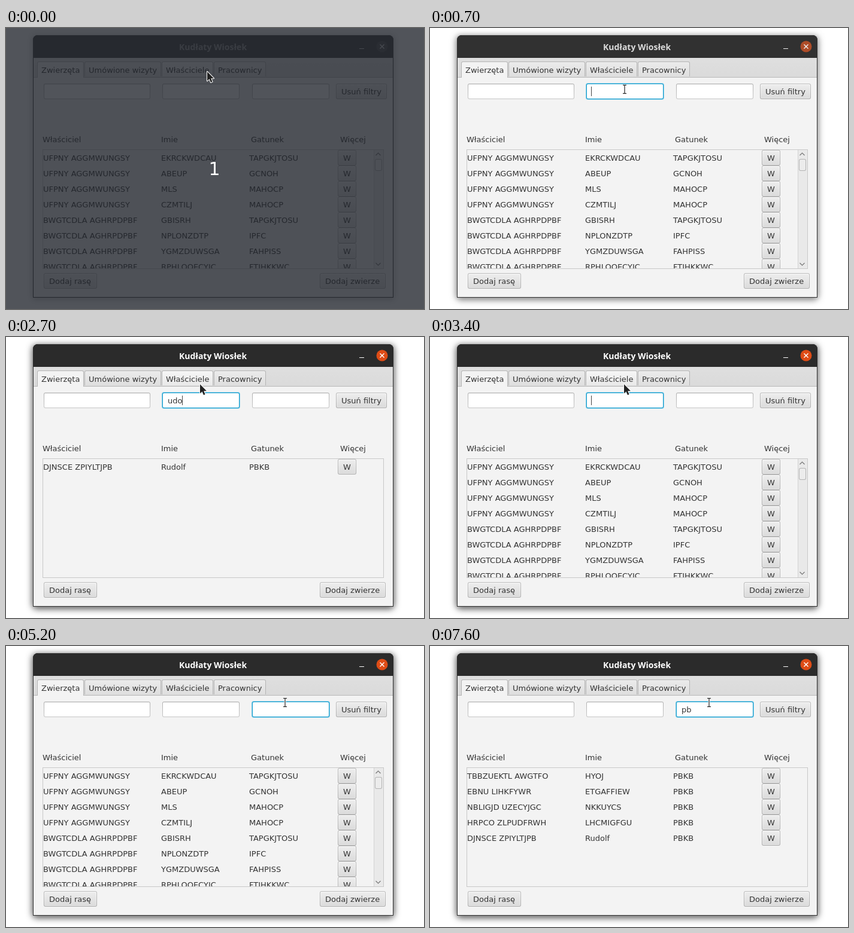
An HTML page with a canvas that plays this animation: 698x470 px, repeating every 8 s.

```html
<!DOCTYPE html>
<html lang="pl">
<head>
<meta charset="utf-8">
<title>Kudłaty Wiosłek</title>
<style>
html, body { margin: 0; width: 100%; height: 100%; overflow: hidden; background: #fff; }
canvas { display: block; }
</style>
</head>
<body>
<canvas id="stage" width="698" height="470"></canvas>
<script>
const ctx = document.getElementById("stage").getContext("2d");
const LOOP = 8000, STEP = 100;
const FONT = '13px "DejaVu Sans", sans-serif';

const TABS = [
  { x: 52, w: 78, label: "Zwierzęta" },
  { x: 131, w: 128, label: "Umówione wizyty" },
  { x: 260, w: 86, label: "Właściciele" },
  { x: 347, w: 87, label: "Pracownicy" }
];
const FIELDS = [{ x: 63, w: 178 }, { x: 261, w: 129 }, { x: 411, w: 129 }];

const RUDOLF = "DJNSCE ZPIYLTJPB|Rudolf|PBKB";
const PB_ROWS = [
  "TBBZUEKTL AWGTFO|HYOJ|PBKB",
  "EBNU LIHKFYWR|ETGAFFIEW|PBKB",
  "NBLIGJD UZECYJGC|NKKUYCS|PBKB",
  "HRPCO ZLPUDFRWH|LHCMIGFGU|PBKB",
  RUDOLF
];
const LISTS = {
  all: [
    "UFPNY AGGMWUNGSY|EKRCKWDCAU|TAPGKJTOSU",
    "UFPNY AGGMWUNGSY|ABEUP|GCNOH",
    "UFPNY AGGMWUNGSY|MLS|MAHOCP",
    "UFPNY AGGMWUNGSY|CZMTILJ|MAHOCP",
    "BWGTCDLA AGHRPDPBF|GBISRH|TAPGKJTOSU",
    "BWGTCDLA AGHRPDPBF|NPLONZDTP|IPFC",
    "BWGTCDLA AGHRPDPBF|YGMZDUWSGA|FAHPISS",
    "BWGTCDLA AGHRPDPBF|RPHLOOECYJC|FTIHKKWC"
  ],
  ud: ["KWOTRE HAGNPLUC|ZUDWEK|MAHOCP", "EBNU LIHKFYWR|TOLUDGH|GCNOH", RUDOLF],
  udo: [RUDOLF],
  p: [
    ...PB_ROWS.slice(0, 3),
    "KWOTRE HAGNPLUC|OWNRIT|PHWEKO",
    ...PB_ROWS.slice(3),
    "SGRLIW FOTNEKCA|MEBGUHT|PHWEKO",
    "SGRLIW FOTNEKCA|LARKOC|PHWEKO"
  ],
  pb: PB_ROWS
};

// Timed states: [start, value]
const NAME_QUERY = [[0, ""], [2000, "u"], [2100, "ud"], [2400, "udo"], [2900, "ud"], [3200, ""]];
const SPECIES_QUERY = [[0, ""], [5500, "p"], [6100, "pb"]];
const LIST = [[0, "all"], [2200, "ud"], [2700, "udo"], [3200, "ud"], [3400, "all"], [5700, "p"], [6300, "pb"]];
const FOCUS = [[0, -1], [600, 1], [4500, 2]];
const CARET = [[0, 1], [1400, 0], [1700, 1], [4000, 0], [4500, 1], [5200, 0], [5500, 1],
  [6000, 0], [6100, 1], [6600, 0], [7200, 1], [7600, 0]];
const POINTER = [[300, 336, 73], [500, 325, 103], [1000, 325, 103], [1200, 324, 79],
  [3900, 324, 79], [4200, 436, 76], [4300, 436, 76], [4500, 466, 95], [LOOP, 466, 95]];

const at = (track, t) => track.filter(k => k[0] <= t).pop()[1];
const mix = (a, b, k) => a + (b - a) * k;
const gray = v => `rgb(${v},${v},${v})`;

function pointerAt(t) {
  const i = POINTER.findIndex(k => k[0] > t);
  if (i < 1) return { x: POINTER[0][1], y: POINTER[0][2] };
  const [a, b] = [POINTER[i - 1], POINTER[i]];
  const k = (t - a[0]) / (b[0] - a[0]);
  return { x: mix(a[1], b[1], k), y: mix(a[2], b[2], k) };
}

function round(x, y, w, h, r, fill) {
  ctx.beginPath();
  ctx.roundRect(x, y, w, h, r);
  ctx.fillStyle = fill;
  ctx.fill();
}

function rect(x, y, w, h, fill) {
  ctx.fillStyle = fill;
  ctx.fillRect(x, y, w, h);
}

function vertical(y, h, top, bottom) {
  const g = ctx.createLinearGradient(0, y, 0, y + h);
  g.addColorStop(0, top);
  g.addColorStop(1, bottom);
  return g;
}

function text(str, x, y, color = "#333", font = FONT) {
  ctx.font = font;
  ctx.fillStyle = color;
  ctx.fillText(str, x, y);
}

function line(color, width, ...points) {
  ctx.beginPath();
  points.forEach(p => ctx.lineTo(...p));
  ctx.strokeStyle = color;
  ctx.lineWidth = width;
  ctx.stroke();
}

function button(x, y, w, h, label) {
  round(x, y, w, h, 3, vertical(y, h, "#bcbcbc", "#adadad"));
  round(x + 1, y + 1, w - 2, h - 2, 2, vertical(y, h, "#fbfbfb", "#e2e2e2"));
  round(x + 2, y + 2, w - 4, h - 4, 1.5, vertical(y, h, "#eeeeee", "#dadada"));
  text(label, x + 9, y + 18);
}

function shadow(x, y, w, h, dy, blur, spread, alpha) {
  ctx.save();
  ctx.shadowColor = `rgba(0,0,0,${alpha})`;
  ctx.shadowBlur = blur;
  ctx.shadowOffsetY = dy;
  round(x - spread, y - spread, w + 2 * spread, h + 2 * spread, 8, "#000");
  ctx.restore();
}

// Shadows are cast by a shape far off stage so only the shadow shows
function softShadow(dy, blur, spread, alpha) {
  if (!alpha) return;
  ctx.save();
  ctx.shadowColor = `rgba(0,0,0,${alpha})`;
  ctx.shadowBlur = blur;
  ctx.shadowOffsetX = 2000;
  ctx.shadowOffsetY = dy;
  round(45 - spread - 2000, 12 - spread, 602 + 2 * spread, 439 + 2 * spread, 8, "#000");
  ctx.restore();
}

function drawFrame(active) {
  rect(0, 0, 698, 470, "#fff");
  softShadow(2, 8, 2, 0.2);
  softShadow(3, 12, 1, 0.5 * active);
  round(45, 12, 602, 439, [8, 8, 0, 0], "#303030");
  const bar = mix(61, 43, active);
  round(45, 12, 602, 38, [8, 8, 0, 0], gray(bar));
  rect(53, 12, 586, 1, gray(bar + 8));
  rect(46, 50, 600, 400, "#f3f3f3");

  ctx.textAlign = "center";
  text("Kudłaty Wiosłek", 345.5, 37, gray(mix(146, 255, active)), 'bold 14px "Open Sans", sans-serif');
  ctx.textAlign = "left";
  const icon = gray(mix(205, 255, active));
  rect(590, 34, 8, 1, icon);
  const hue = [[76, 222], [76, 76], [76, 22]].map(c => mix(...c, active));
  ctx.beginPath();
  ctx.arc(628, 31, 9.5, 0, 7);
  ctx.fillStyle = `rgb(${hue})`;
  ctx.fill();
  line(icon, 1.4, [624.5, 27.5], [631.5, 34.5]);
  line(icon, 1.4, [631.5, 27.5], [624.5, 34.5]);
}

function drawTabs(p) {
  rect(46, 50, 600, 33, vertical(50, 33, "#dfdfdf", "#dadada"));
  rect(46, 82, 600, 1, "#b8b8b8");
  TABS.forEach(({ x, w, label }, i) => {
    const hover = p.x >= x && p.x < x + w && p.y >= 57 && p.y < 83;
    const fill = i === 0 ? "#f3f3f3"
      : hover ? vertical(57, 25, "#f6f6f6", "#e8e8e8") : vertical(57, 25, "#ebebeb", "#dedede");
    const h = i === 0 ? 27 : 25;
    round(x, 56, w, h, [3, 3, 0, 0], "#b5b5b5");
    round(x + 1, 57, w - 2, h - 1, [2, 2, 0, 0], fill);
    text(label, x + 7, 75);
  });
}

function drawFields(t) {
  const focus = at(FOCUS, t);
  const queries = ["", at(NAME_QUERY, t), at(SPECIES_QUERY, t)];
  FIELDS.forEach(({ x, w }, i) => {
    const on = i === focus;
    if (on) round(x - 1, 92, w + 2, 28, 4, "#7cc9e5");
    round(x, 93, w, 26, 3, on ? "#1a9fce" : vertical(93, 26, "#b0b0b0", "#c6c6c6"));
    round(x + 1, 94, w - 2, 24, 2, "#fff");
    if (!on && i >= 0) rect(x + 2, 94, w - 4, 1, "#f0f0f0");
    text(queries[i], x + 9, 111);
    if (on && at(CARET, t)) {
      rect(Math.floor(x + 8.6 + ctx.measureText(queries[i]).width), 98, 1, 16, "#444");
    }
  });
  button(551, 93, 85, 26, "Usuń filtry");
}

function drawScrollbar(thumb) {
  rect(614, 204, 16, 198, "#e9e9e9");
  rect(614, 204, 1, 198, "#d2d2d2");
  line("#777", 1.2, [617.5, 213], [621.5, 209], [625.5, 213]);
  line("#777", 1.2, [617.5, 393], [621.5, 397], [625.5, 393]);
  round(616, 219, 12, thumb, 3, "#b4b4b4");
  round(617, 220, 10, thumb - 2, 2, "#ececec");
}

function drawTable(t) {
  text("Właściciel", 61, 191);
  text("Imie", 259, 191);
  text("Gatunek", 409, 191);
  text("Więcej", 558, 191);
  rect(61, 203, 570, 200, "#c8c8c8");
  rect(62, 204, 568, 198, "#f3f3f3");

  const key = at(LIST, t);
  ctx.save();
  ctx.beginPath();
  ctx.rect(61, 204, 569, 198);
  ctx.clip();
  LISTS[key].forEach((row, i) => {
    const y = 204 + 26 * i;
    row.split("|").forEach((cell, c) => text(cell, [62, 259, 406][c], y + 18));
    button(554, y, 31, 26, "W");
  });
  if (LISTS[key].length > 7) drawScrollbar(key === "all" ? 20 : 150);
  ctx.restore();
}

function drawPointer({ x, y }) {
  const inField = y >= 93 && y < 119 && FIELDS.some(f => x >= f.x && x < f.x + f.w);
  ctx.save();
  ctx.translate(Math.round(x), Math.round(y));
  ctx.lineJoin = "round";
  if (inField) {
    for (const [color, width] of [["#fff", 3], ["#222", 1.2]]) {
      line(color, width, [-3, -7.5], [3, -7.5]);
      line(color, width, [-3, 6.5], [3, 6.5]);
      line(color, width, [0, -7.5], [0, 6.5]);
    }
  } else {
    const arrow = new Path2D("M0 0V15.5L3.6 12.2 6 18 8.6 16.9 6.2 11.3H11Z");
    ctx.strokeStyle = "#fff";
    ctx.lineWidth = 2;
    ctx.stroke(arrow);
    ctx.fillStyle = "#222";
    ctx.fill(arrow);
  }
  ctx.restore();
}

function draw(t) {
  const p = pointerAt(t);
  drawFrame(Math.min(1, Math.max(0, (t - 500) / 300)));
  drawTabs(p);
  drawFields(t);
  drawTable(t);
  button(63, 410, 89, 26, "Dodaj rasę");
  button(524, 410, 110, 26, "Dodaj zwierze");
  if (t < 100) {
    rect(0, 0, 698, 470, "rgba(33,37,44,0.78)");
    text("1", 338.5, 246, "#fff", '30px "DejaVu Sans", sans-serif');
  }
  drawPointer(p);
}

function tick() {
  const t = performance.now() % LOOP;
  draw(Math.floor(t / STEP) * STEP);
  requestAnimationFrame(tick);
}
tick();
</script>
</body>
</html>
```
